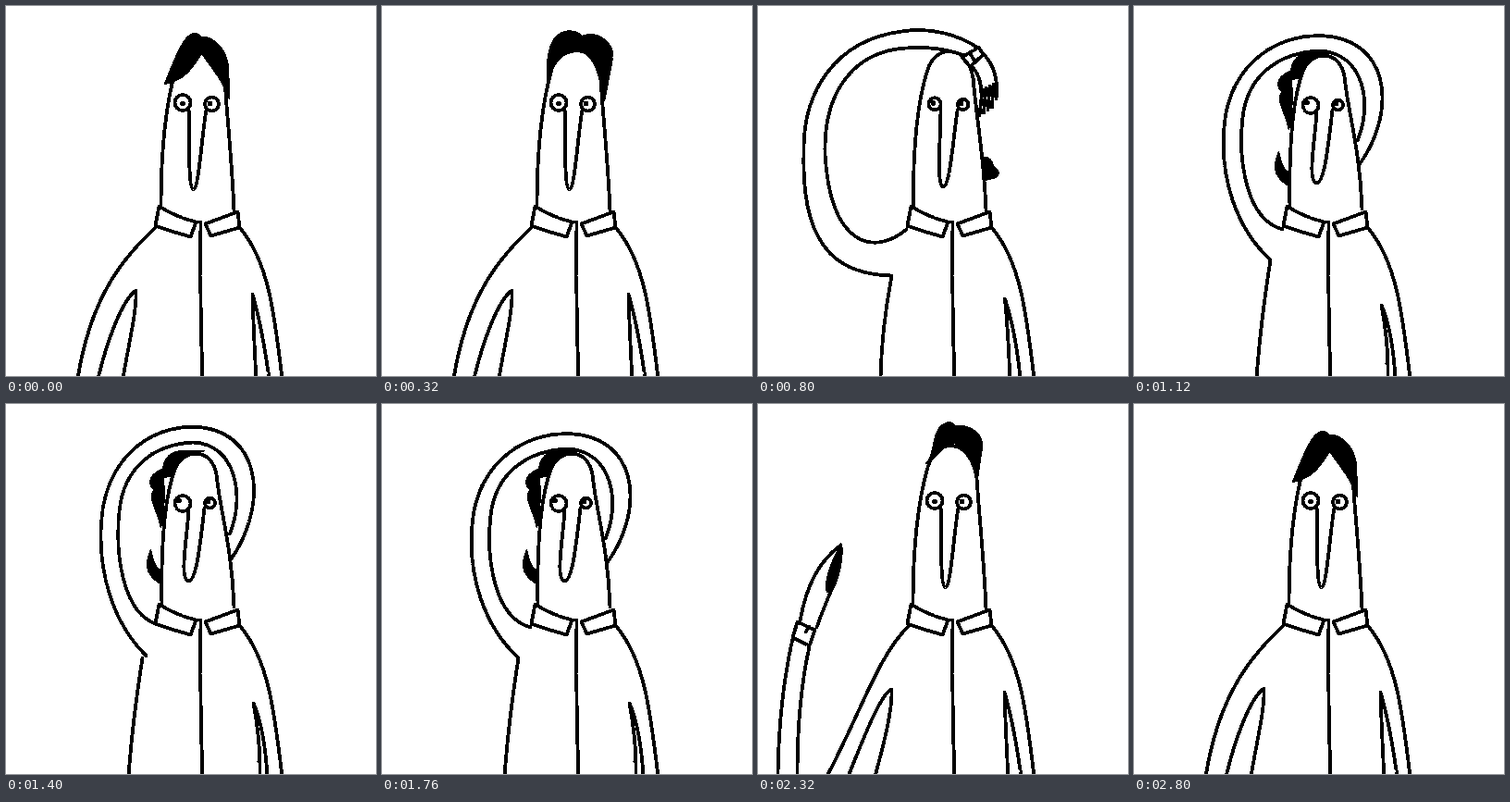
Write an HTML page that moves like this. It is 400x400 px and loops after 2.88 s.

```html
<!DOCTYPE html>
<html lang="en">
<head>
<meta charset="utf-8">
<title>Long arm</title>
<style>
html, body { margin: 0; width: 100%; height: 100%; overflow: hidden; background: #fff; }
svg { display: block; width: 100%; height: 100%; }
#ink { fill: none; stroke: #000; stroke-width: 3.8; stroke-linecap: round; stroke-linejoin: round; }
.paper { fill: #fff; }
.mask { fill: #fff; stroke: none; }
.solid { fill: #000; stroke-width: 1.5; }
</style>
</head>
<body>
<svg viewBox="0 0 400 400" shape-rendering="crispEdges">
  <filter id="rough" filterUnits="userSpaceOnUse" x="-10" y="-10" width="420" height="420" color-interpolation-filters="sRGB">
    <feTurbulence type="fractalNoise" baseFrequency=".2" seed="4"/>
    <feColorMatrix values="1 0 0 0 0  0 1 0 0 0  0 0 1 0 0  0 0 0 0 1"/>
    <feDisplacementMap in="SourceGraphic" scale="1.8" xChannelSelector="R" yChannelSelector="G"/>
  </filter>
  <g filter="url(#rough)"><g id="ink" transform="translate(.5 .5)"></g></g>
</svg>
<script>
const mix = (a, b, k) => a + (b - a) * k;
const clamp01 = v => Math.max(0, Math.min(1, v));

// Blends two paths that share the same commands.
function blend(from, to, k) {
  const ends = to.match(/[\d.]+/g);
  let i = 0;
  return from.replace(/[\d.]+/g, v => mix(+v, +ends[i++], k).toFixed(2));
}

// Path at a step, from a few key poses { step: path }.
function pose(keys, step) {
  const steps = Object.keys(keys).map(Number);
  const i = Math.max(1, steps.findIndex(s => s >= step));
  const last = step > steps[steps.length - 1] ? steps.length - 1 : i;
  const [a, b] = [steps[last - 1], steps[last]];
  return blend(keys[a], keys[b], clamp01((step - a) / (b - a)));
}

const head = {
  7: 'M167,216 C167,160 171,110 183,68 C192,36 229,34 236,80 C239,125 244,170 246,221',
  14: 'M168,219 C167,160 170,100 183,68 C192,48 222,46 227,76 C231,115 244,155 246,219'
};
const nose = {
  7: 'M197,108 C198,140 196,197 202,198 C208,198 211,140 216,112',
  14: 'M197,113 C196,140 186,190 197,191 C206,190 210,145 214,112'
};
const armpit = {
  7: 'M270,402 Q267,350 266,311 Q276,345 284,402',
  14: 'M274,402 Q275,365 267,323 Q279,350 282,402'
};
const hair = {
  1: 'M171,84 C180,62 190,32 202,29 Q206,28 210,33 C225,32 240,48 240,70 L241,100 C235,82 222,66 211,51 C203,62 196,79 171,84Z',
  4: 'M178,80 C177,55 180,30 198,27 Q208,25 216,32 C232,26 250,38 249,55 L240,102 C235,78 230,50 212,49 C195,48 186,60 178,80Z',
  7: 'M181,64 C192,55 186,25 203,20 Q208,18 213,23 C228,22 242,30 242,45 L237,79 C234,60 222,42 211,42 C200,42 194,58 181,64Z'
};
const sleeve = {
  4: 'M162,238 C128,270 92,310 77,402 M99,402 C108,365 124,318 140,307 C141,330 132,365 126,402',
  7: 'M163,239 C130,270 112,330 74,402 M97,402 C112,365 132,312 144,308 C145,330 136,365 126,402'
};
const torsoSide = {
  10: 'M132,402 Q133,350 144,291',
  14: 'M132,402 Q136,345 147,274'
};
const reachOuter = {
  9: 'M141,300 C60,345 5,290 7,200 C10,90 60,20 140,15 C165,12 180,14 194,19',
  10: 'M144,291 C97,290 46,272 49,160 C47,90 85,36 155,27 C185,22 215,30 238,45',
  14: 'M147,274 C110,240 92,185 97,130 C102,60 160,24 215,33 C280,45 280,120 243,171'
};
// Runs back from the hand to the collar, so it can close the outer edge.
const reachInner = {
  9: '186,38 C175,36 160,35 140,37 C75,40 30,100 29,190 C33,310 130,315 160,242',
  10: '222,53 C205,46 180,43 160,45 C105,48 70,90 72,160 C78,260 125,270 160,241',
  14: '241,145 C258,105 248,50 200,48 C155,50 122,75 117,120 C112,165 120,230 160,241'
};
const hairBehind =
  'M170,79 Q166,52 190,50 L214,50 Q186,60 183,76Z ' +
  'M168,70 C150,78 155,90 160,92 C152,102 162,110 167,133 Q172,110 170,79Z ' +
  'M156,157 C147,178 155,187 168,195 L167,179 Q160,178 156,157Z';
const hairBun = 'M243,163 Q252,162 254,173 Q264,179 256,185 L244,188Z';
const collars =
  'M165,216 L161,237 Q180,244 199,249 L205,233 Q184,228 165,216Z M215,235 L250,222 L252,239 L221,248Z';
const zip = 'M205,233 L210,233 Q209,320 212,402';
const rightSleeve = 'M253,240 C282,275 289,325 298,402';

const path = (d, style = '') => `<path d="${d}" class="${style}"/>`;
const group = (transform, body) => `<g transform="${transform}">${body}</g>`;
const circle = (x, y, r, style) => `<circle cx="${x}" cy="${y}" r="${r}" class="${style}"/>`;

// The eyes squint halfway and end up glancing to the upper left.
function eyes(turn) {
  const squint = 2 * Math.sin(Math.PI * turn);
  return circle(190.5, 104 + 3 * turn, 8.5 - squint, 'paper') +
    circle(222 - 2 * turn, 105.5 + turn, mix(7.5, 5.5, turn) - squint / 2, 'paper') +
    circle(190.5 - 4 * turn, 105 - turn, 2, 'solid') +
    circle(220 - 2 * turn, 105, 2, 'solid');
}

function risingArm(step) {
  const lift = 78 * (7 - step), lean = 9 * Math.max(0, step - 7);
  return group(`translate(0 ${lift}) rotate(${lean} 32 400)`,
    path('M24,540 L21,400 Q22,320 37,253 M44,540 L42,400 Q42,320 55,262') +
    path('M42,235 L37,252 L55,261 L61,244Z M55,240 L51,246') +
    path('M45,234 C52,195 65,170 89,152 C92,180 75,205 63,241') +
    path('M89,152 Q92,180 79,203 L74,203 Q70,185 89,152Z', 'solid'));
}

function bentHand() {
  let d = 'M241,49 Q261,68 257,100 M230,64 Q241,75 241,95';
  for (let i = 0; i < 4; i++) d += `M${242 + 4 * i},${90 - 2 * i} L${239 + 4.5 * i},${118 - 3 * i}`;
  return path('M238,44 L243,52 L229,65 L220,55Z', 'paper') + path('M229,51 L233,58') + path(d);
}

function reachingArm(step) {
  const outer = pose(reachOuter, step), inner = pose(reachInner, step);
  const [x, y] = outer.match(/[\d.]+/g).slice(-2);
  const pull = step > 14 ? 1 : 0;
  const squeeze = mix(1, .96 + .003 * (step - 15), pull);
  const arm = path(`${outer} L${inner}Z`, 'mask') + path(`${outer} M${inner}`);
  return group(`translate(255 400) scale(${squeeze} ${1 + .02 * pull}) translate(-255 -400)`, arm) +
    (step < 12 ? group(`translate(${x - 238} ${y - 45})`, bentHand()) : '');
}

function figure(step) {
  const reaching = step >= 9, behind = step >= 11;
  const turn = clamp01((step - 7) / 7);
  return [
    behind && reachingArm(step),
    step >= 12 && path(hairBehind, 'solid'),
    (step === 10 || step === 11) && path(hairBun, 'solid'),
    path(pose(head, step), 'paper'),
    step < 10 && path(pose(hair, step), 'solid'),
    path(pose(nose, step)),
    eyes(turn),
    reaching && !behind && reachingArm(step),
    path(reaching ? pose(torsoSide, step) : pose(sleeve, step)),
    path(rightSleeve) + path(pose(armpit, step)),
    path(collars, 'paper') + path(zip),
    step >= 5 && step <= 8 && risingArm(step)
  ].filter(Boolean).join('');
}

// Out in 80 ms steps, a held stretch with one twitch, then the same way back.
function stepAt(t) {
  const tick = Math.floor(t / 80);
  if (t >= 1200 && t < 1760) return t >= 1400 && t < 1560 ? 16 : 15;
  return Math.max(1, Math.min(tick, 36 - tick));
}

const ink = document.getElementById('ink');
const start = performance.now();
let shown;
function frame() {
  const step = stepAt((performance.now() - start) % 2880);
  if (step !== shown) ink.innerHTML = figure(shown = step);
  requestAnimationFrame(frame);
}
frame();
</script>
</body>
</html>
```
